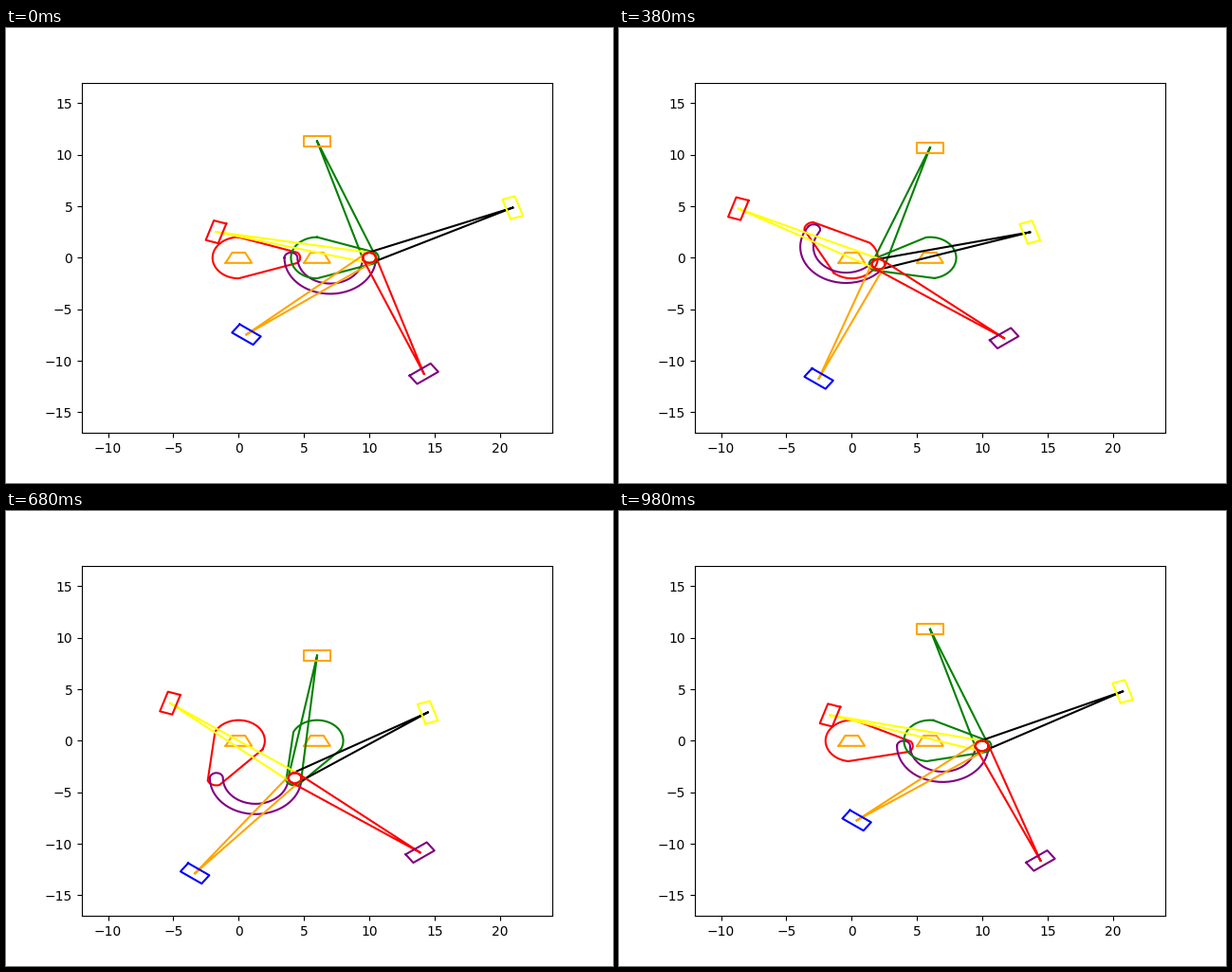
These frames come from a looping animation (640x480 px, 1 s). A matplotlib script:

```python
import numpy as np
import matplotlib.pyplot as plt
from matplotlib.animation import FuncAnimation

FRAMES, INTERVAL = 50, 20
CRANK, GROUND, ROD = 4, 6, 12
O, D = np.array([0.0, 0.0]), np.array([GROUND, 0.0])
PIN = 0.5

# slide direction in degrees, rod colour, slider colour
PISTONS = [(90, "green", "orange"), (18, "black", "yellow"),
           (162, "yellow", "red"), (234, "orange", "blue"),
           (306, "red", "purple")]


def arc(cx, cy, r, start, end):
    t = np.radians(np.linspace(start, end, 60))
    return np.column_stack([cx + r * np.cos(t), cy + r * np.sin(t)])


def closed(*parts):
    points = np.vstack(parts)
    return np.vstack([points, points[:1]])


def place(shape, origin, direction):
    """Turn a shape so that its x axis follows direction, then move it."""
    c, s = direction / np.hypot(*direction)
    return shape @ np.array([[c, s], [-s, c]]) + origin


ARM = closed(arc(0, 0, 2, 90, 270),
             arc(CRANK, 0, PIN * np.sqrt(2), -45, 45))
COUPLER = closed(arc(GROUND / 2, 0, 3.5, 180, 360),
                 arc(GROUND, 0, PIN, 0, 180),
                 arc(GROUND / 2, 0, 2.5, 360, 180),
                 arc(0, 0, PIN, 0, 180))
RODSHAPE = closed([[ROD, 0]], arc(0, 0, PIN, 90, 270))
SLIDER = closed([[-0.5, -1], [0.5, -1], [0.5, 1], [-0.5, 1]])
BASE = closed([[-1, -0.5], [1, -0.5], [0.5, 0.5], [-0.5, 0.5]])
RING = arc(0, 0, PIN, 0, 360)


def joints(angle):
    """Crank pin and rocker pin; the linkage is crossed in the first half turn."""
    a = CRANK * np.array([np.cos(angle), np.sin(angle)])
    link = np.array([GROUND, 0.0])
    if angle < np.pi:
        axis = D - a
        link = 2 * axis * (link @ axis) / (axis @ axis) - link
    return a, a + link


def slider_position(pin, u):
    w = pin - D
    along = w @ u
    across2 = w @ w - along ** 2
    return D + u * (along + np.sqrt(ROD ** 2 - across2))


fig, ax = plt.subplots(figsize=(6.4, 4.8), dpi=100)
ax.set_xlim(-12, 24)
ax.set_ylim(-17, 17)


def line(color):
    return ax.plot([], [], color=color, lw=1.5)[0]


for pivot in (O, D):
    line("orange").set_data(*(BASE + pivot).T)

crank, coupler, rocker = line("red"), line("purple"), line("green")
pistons = [(np.array([np.cos(np.radians(deg)), np.sin(np.radians(deg))]),
            line(rod), line(block)) for deg, rod, block in PISTONS]
ring = line("red")


def update(i):
    a, b = joints(2 * np.pi * i / FRAMES)
    crank.set_data(*place(ARM, O, a).T)
    coupler.set_data(*place(COUPLER, a, b - a).T)
    rocker.set_data(*place(ARM, D, b - D).T)
    artists = [crank, coupler, rocker]
    for u, rod, block in pistons:
        p = slider_position(b, u)
        rod.set_data(*place(RODSHAPE, b, p - b).T)
        block.set_data(*place(SLIDER, p, u).T)
        artists += [rod, block]
    ring.set_data(*(RING + b).T)
    return artists + [ring]


anim = FuncAnimation(fig, update, frames=FRAMES, interval=INTERVAL,
                     repeat=True, repeat_delay=0)
plt.show()
```
